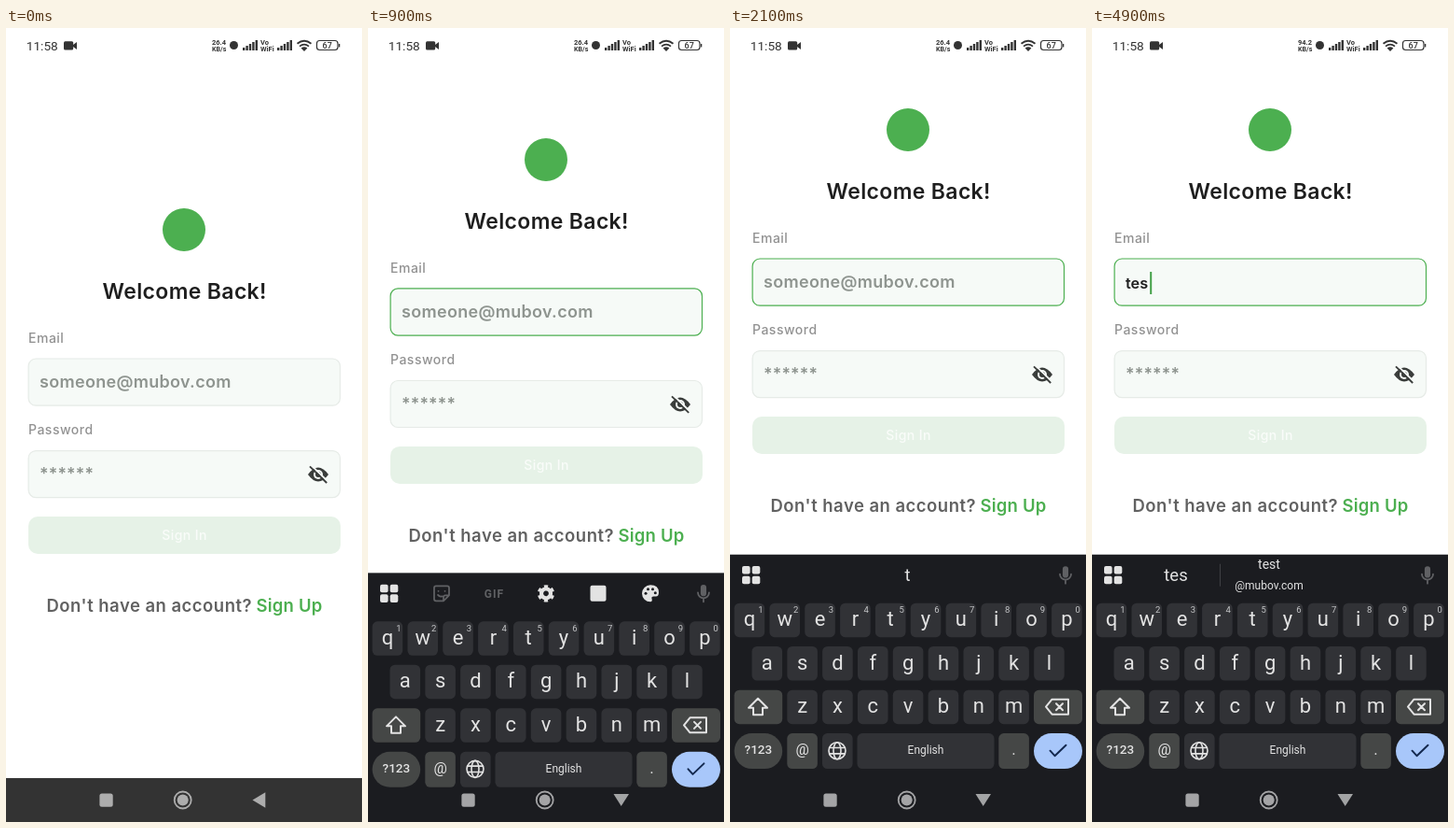
An HTML page for the animation above (5000 ms loop, 382 px wide and 850 px high).

```html
<!DOCTYPE html>
<html lang="en">
<head>
<meta charset="utf-8">
<title>Sign in</title>
<style>
html, body { margin: 0; width: 100%; height: 100%; overflow: hidden; background: #fff; }
svg { display: block; width: 382px; height: 850px; }
text { white-space: pre; }
#status { font-family: Roboto, sans-serif; font-weight: 500; fill: #333; }
.tiny { font-size: 7.5px; font-weight: 700; }
#page { font-family: Inter, "Open Sans", sans-serif; font-weight: 600; }
.label { font-size: 14px; font-weight: 500; letter-spacing: .5px; fill: #929292; }
.hint { font-size: 18px; letter-spacing: .3px; fill: #8e948f; }
.ask { font-size: 18.5px; letter-spacing: .48px; fill: #616161; }
.box { fill: #f6faf7; stroke: #e6ebe7; stroke-width: 1.2; }
.box.on { stroke: #4caf50; }
.mid { text-anchor: middle; }
#board { font-family: Roboto, sans-serif; fill: #e3e3e3; text-anchor: middle; }
.line { fill: none; stroke: #e3e3e3; stroke-width: 2; stroke-linejoin: round; stroke-linecap: round; }
.dim { fill: #606164; }
.dimline { fill: none; stroke: #606164; stroke-width: 1.8; stroke-linecap: round; stroke-linejoin: round; }
</style>
</head>
<body>
<svg viewBox="0 0 382 850">
  <rect width="382" height="850" fill="#fff"/>

  <g id="status">
    <text x="21.7" y="24" font-size="13.7" font-weight="400">11:58</text>
    <rect x="62" y="14.3" width="10.2" height="9.2" rx="1.5"/>
    <path d="M72 18l4-3v8l-4-3z"/>
    <text id="rate" class="tiny" x="221" y="18">26.4</text>
    <text class="tiny" x="221" y="25.3" style="font-size:7.1px">KB/s</text>
    <circle cx="244.5" cy="18.5" r="4.5"/>
    <g id="bars"></g>
    <text class="tiny" x="273" y="18">Vo</text>
    <text class="tiny" x="273" y="25.3">WiFi</text>
    <g fill="none" stroke="#333" stroke-width="1.8">
      <path d="M312.5 16.8q7.5-6 15 0M315 19.6q5-4 10 0"/>
    </g>
    <path d="M320 25l-3.4-3.6q3.4-2.4 6.8 0z"/>
    <rect x="333.5" y="13.5" width="22.5" height="10" rx="3" fill="none" stroke="#333" stroke-width="1.2"/>
    <rect x="357" y="17" width="1.3" height="3.4"/>
    <text class="mid" x="344.7" y="21.8" font-size="9">67</text>
  </g>

  <g id="page">
    <circle cx="191" cy="216" r="23" fill="#4caf50"/>
    <text class="mid" x="191.7" y="290" font-size="23" letter-spacing=".35" fill="#1e1e1e">Welcome Back!</text>
    <text class="label" x="24" y="337">Email</text>
    <rect id="email" class="box" x="24.1" y="354" width="334.4" height="50.2" rx="8"/>
    <text id="hint" class="hint" x="36" y="385">someone@mubov.com</text>
    <text id="typed" x="36" y="385.8" font-size="16.3" fill="#1e1e1e"></text>
    <rect id="caret" y="368" width="2" height="24" fill="#43a047"/>
    <text class="label" x="24" y="435">Password</text>
    <rect class="box" x="24.1" y="452.6" width="334.4" height="50" rx="8"/>
    <text x="36" y="483.3" font-size="17.6" letter-spacing=".2" fill="#8e948f">******</text>
    <g id="eye">
      <path d="M324 478q11-15 22 0q-11 15-22 0z" fill="#3a3d3b"/>
      <circle cx="335" cy="478" r="5" fill="#f6faf7"/>
      <circle cx="335" cy="478" r="3" fill="#3a3d3b"/>
      <path d="M327.8 468.4l18 17.6" stroke="#f6faf7" stroke-width="2"/>
      <path d="M326 469.4l18.2 17.6" stroke="#3a3d3b" stroke-width="1.9"/>
    </g>
    <rect x="24" y="523" width="335" height="40" rx="10" fill="#e6f2e7"/>
    <text class="mid" x="191.5" y="548" font-size="14" font-weight="500" letter-spacing=".4" fill="#f9fcf9">Sign In</text>
    <text class="ask" x="43.5" y="625">Don't have an account?</text>
    <text class="ask" x="268.5" y="625" style="fill:#4caf50;letter-spacing:.2px">Sign Up</text>
  </g>

  <rect id="navbar" y="803" width="382" height="47" fill="#333"/>

  <g id="board">
    <rect width="382" height="600" fill="#1b1c20"/>
    <g id="grid"></g>
    <g class="dimline" transform="translate(360 22)">
      <rect x="-2.2" y="-8.5" width="4.4" height="10.5" rx="2.2" fill="#606164"/>
      <path d="M-6-1a6 6 0 0 0 12 0M0 5v4"/>
    </g>
    <g id="tools">
      <path class="dimline" d="M87 24V16q0-2-2-2H73q-2 0-2 2v12q0 2 2 2h8zM81 30v-4q0-2 2-2h4M75.5 19.5h.1M82.5 19.5h.1M75 23.5q2 2.5 4.5 1.5"/>
      <text class="dim" x="135.5" y="26.3" font-size="12" font-weight="700" letter-spacing="1">GIF</text>
      <g transform="translate(191 22) rotate(30)" fill="none" stroke="#e3e3e3">
        <circle r="5" stroke-width="4.2"/>
        <circle r="7.8" stroke-width="2.8" pathLength="12" stroke-dasharray="1 1" stroke-dashoffset=".5"/>
      </g>
      <rect x="238.5" y="13.5" width="17" height="17" rx="2"/>
      <g transform="translate(303 22)">
        <path d="M0-9a9 9 0 1 0 0 18q2.5-.5 1.6-3q-1-2.8 2-2.8h2.4q3 0 3-4.2Q9-9 0-9z"/>
        <g fill="#1b1c20">
          <circle cx="-5" r="1.5"/><circle cx="-2.5" cy="-4.5" r="1.5"/>
          <circle cx="2.5" cy="-4.5" r="1.5"/><circle cx="5.3" cy="-.5" r="1.5"/>
        </g>
      </g>
    </g>
    <text id="word" y="28.5" font-size="18.5"></text>
    <g id="more">
      <path d="M137.5 10v24" stroke="#3e3f43"/>
      <text x="190" y="15.5" font-size="14">test</text>
      <text x="190" y="37" font-size="12">@mubov.com</text>
    </g>
    <g id="keys"></g>
    <path class="line" d="M30 154l10 10h-5v7.5H25V164h-5z"/>
    <path class="line" d="M339 163l6.5-8H363v16h-17.5zM350 159.5l7 7m0-7l-7 7"/>
    <g class="line" style="stroke-width:1.6">
      <circle cx="115" cy="210" r="9"/>
      <ellipse cx="115" cy="210" rx="4" ry="9"/>
      <path d="M107 206.8h16M107 213.2h16"/>
    </g>
    <path class="line" d="M343.5 210l5 5.5l12-11.5" style="stroke:#14294f"/>
  </g>

  <g id="nav" fill="#fff" opacity=".6">
    <rect x="100.4" y="819.4" width="14.3" height="14.3" rx="2.5"/>
    <circle cx="189.7" cy="826.5" r="9" fill="none" stroke="#fff" stroke-width="1.8"/>
    <circle cx="189.7" cy="826.5" r="6"/>
    <path id="back"/>
  </g>
</svg>
<script>
const LOOP = 5000, TICK = 100;
const $ = id => document.getElementById(id);

function add(parent, tag, attrs, text) {
  const node = document.createElementNS("http://www.w3.org/2000/svg", tag);
  for (const name in attrs) node.setAttribute(name, attrs[name]);
  if (text) node.textContent = text;
  parent.append(node);
}

// signal strength
for (const left of [254, 291])
  for (let i = 0; i < 5; i++)
    add($("bars"), "rect", { x: left + i * 3.4, y: 21 - i * 2, width: 2.4, height: 3 + i * 2 });

for (const x of [13, 23.7])
  for (const y of [12.3, 23])
    add($("grid"), "rect", { x, y, width: 8.6, height: 8.6, rx: 2 });

// keyboard
const PITCH = 37.83, PLAIN = "#313236", SPECIAL = "#454746";

function key(x, y, width, fill, label, size = 22, rx = 5.5, weight = 400) {
  add($("keys"), "rect", { x, y, width, height: y > 190 ? 38 : 36.5, rx, fill });
  if (label) add($("keys"), "text", { x: x + width / 2, y: y + 18.4 + size * .28, "font-size": size, "font-weight": weight }, label);
}

[["qwertyuiop", 4.6, 52], ["asdfghjkl", 23.5, 98.3], ["zxcvbnm", 61.3, 145]].forEach(([letters, left, y], row) => {
  [...letters].forEach((c, i) => {
    const x = left + i * PITCH;
    key(x, y, 32.6, PLAIN, c);
    if (!row) add($("keys"), "text", { x: x + 28.2, y: y + 10.5, "font-size": 9.5, fill: "#c6c7c9" }, String((i + 1) % 10));
  });
});
key(4.6, 145, 51.6, SPECIAL);
key(326, 145, 52, SPECIAL);
key(4.6, 191.4, 51.6, SPECIAL, "?123", 13.5, 19, 500);
key(61.3, 191.4, 32.6, SPECIAL, "@", 16);
key(99, 191.4, 32.6, PLAIN);
key(136.5, 191.4, 147, PLAIN, "English", 12);
key(288.3, 191.4, 32.6, SPECIAL, ".", 17);
key(326, 191.4, 52, "#a8c7fa", "", 0, 19);

// [time, value] steps
const TYPED = [[0, ""], [2200, "t"], [3500, "te"], [3900, "tes"]];
const WORD = [[0, ""], [2000, "t"], [3400, "te"], [3800, "tes"]];
const CARET_X = [36, 43.2, 53, 62.2];
const FOCUS = 300, OPEN = 742, TOP = 563.7;

const last = (steps, t) => steps.filter(s => s[0] <= t).pop();
const decay = (t, start, span) => Math.exp(-Math.max(0, t - start) / span);
const show = (id, on) => $(id).setAttribute("visibility", on ? "visible" : "hidden");
const slide = (id, y) => $(id).setAttribute("transform", `translate(0 ${y.toFixed(2)})`);

function draw(t) {
  const open = t >= OPEN;
  const [since, typed] = last(TYPED, t);
  const word = last(WORD, t)[1];

  slide("page", t >= 1200 ? -107 : 107 * (decay(t, 765, 111.6) - 1));
  slide("board", TOP + 286 * decay(t, OPEN, 59));
  show("board", open);
  show("navbar", !open);
  $("back").setAttribute("d", open ? "M263.5 820h16.5l-8.3 13z" : "M264.5 826.5l13.8-8.2v16.4z");

  $("email").classList.toggle("on", t >= FOCUS);
  $("typed").textContent = typed;
  show("hint", !typed);
  $("caret").setAttribute("x", CARET_X[typed.length]);
  show("caret", t >= FOCUS && (t - (since || FOCUS)) % 1000 < 500);

  const full = word.length > 2;
  $("word").textContent = word;
  $("word").setAttribute("x", full ? 90 : 190.5);
  show("more", open && full);
  show("tools", open && !word);
  $("rate").textContent = t < 2300 ? "26.4" : "94.2";
}

const start = performance.now();
function frame() {
  const t = (performance.now() - start) % LOOP;
  draw(Math.floor(t / TICK) * TICK);
  requestAnimationFrame(frame);
}
frame();
</script>
</body>
</html>
```
